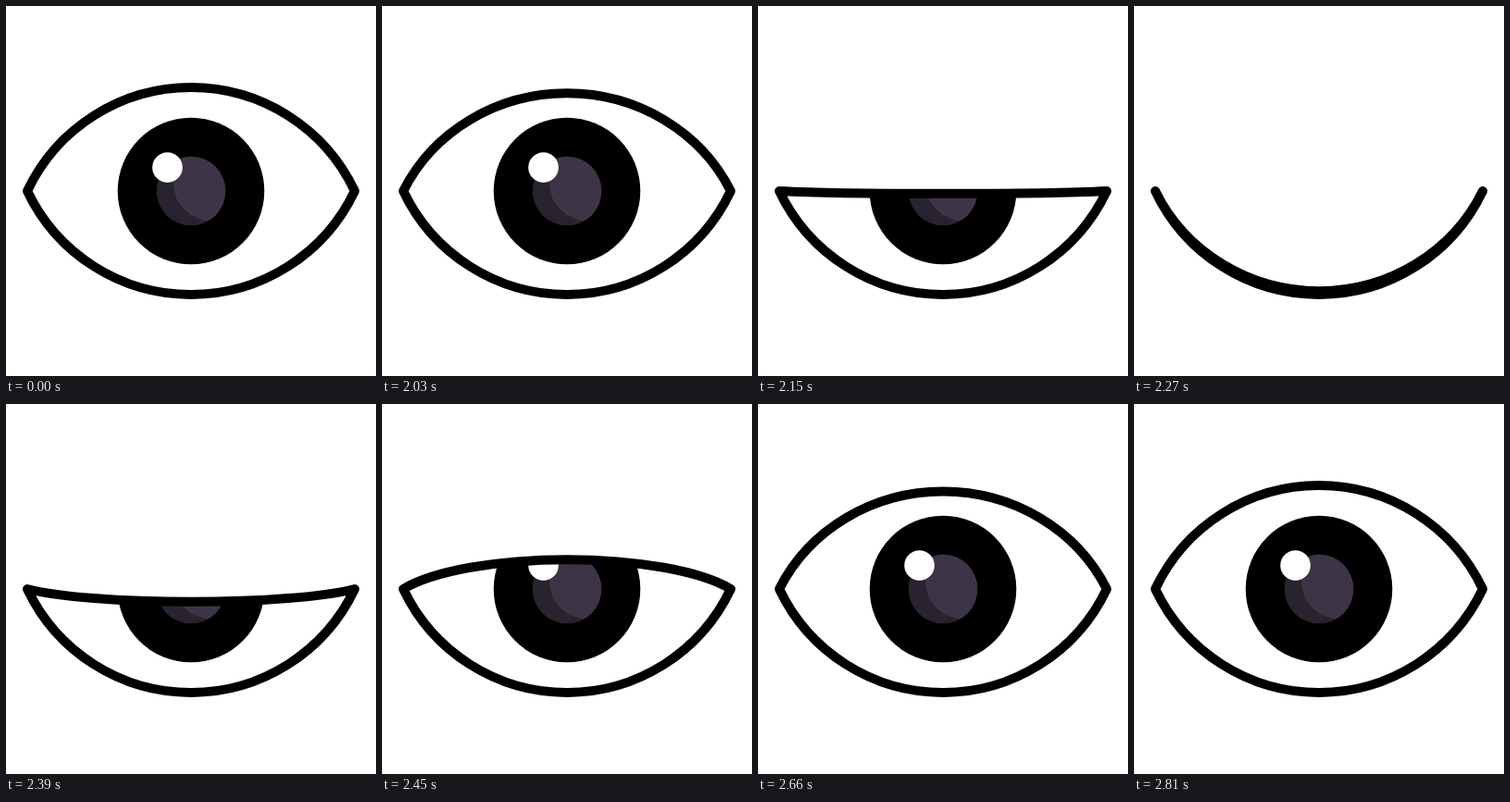
Recreate the animation shown at these times as an HTML page. Size 400x400 px, loop 2840 ms.

```html
<!DOCTYPE html>
<html lang="en">
<head>
<meta charset="utf-8">
<title>Blinking eye</title>
<style>
  html, body { margin: 0; width: 100%; height: 100%; overflow: hidden; background: #fff; }
  svg { display: block; width: 100%; height: 100%; }
</style>
</head>
<body>
<svg viewBox="0 0 400 400">
  <clipPath id="opening"><path class="lids"/></clipPath>
  <clipPath id="pupil"><circle cx="200" cy="200" r="37.3"/></clipPath>
  <g clip-path="url(#opening)">
    <circle cx="200" cy="200" r="79.3"/>
    <g clip-path="url(#pupil)">
      <rect x="160" y="160" width="80" height="80" fill="#28232f"/>
      <circle cx="222.3" cy="191" r="41.5" fill="#3d3547"/>
    </g>
    <circle cx="174.5" cy="174.5" r="16.3" fill="#fff"/>
  </g>
  <path class="lids" fill="none" stroke="#000" stroke-width="10" stroke-linejoin="round"/>
</svg>
<script>
  const LOOP = 2840, STEP = 30;
  const CLOSE_AT = 1998, CLOSE_FOR = 300;
  const OPEN_AT = CLOSE_AT + CLOSE_FOR, OPEN_FOR = 522;
  const RADIUS = 195.9;
  const lids = document.querySelectorAll('.lids');

  // 0 = wide open, 1 = shut
  function closure(t) {
    if (t < 2030) return 0;
    t -= (t - 2030) % STEP;
    if (t < OPEN_AT) return (1 - Math.cos(Math.PI * (t - CLOSE_AT) / CLOSE_FOR)) / 2;
    return Math.max(0, 1 - (t - OPEN_AT) / OPEN_FOR) ** 3;
  }

  function draw(now) {
    // The upper lid is an arc squashed vertically until it flips onto the lower one.
    const bend = 1 - 2.009 * closure(now % LOOP);
    const upper = `A${RADIUS} ${RADIUS * Math.abs(bend)} 0 0 ${bend > 0 ? 1 : 0} 377 200`;
    const d = `M23 200${upper}A${RADIUS} ${RADIUS} 0 0 1 23 200Z`;
    lids.forEach(p => p.setAttribute('d', d));
    requestAnimationFrame(draw);
  }
  draw(0);
</script>
</body>
</html>
```
